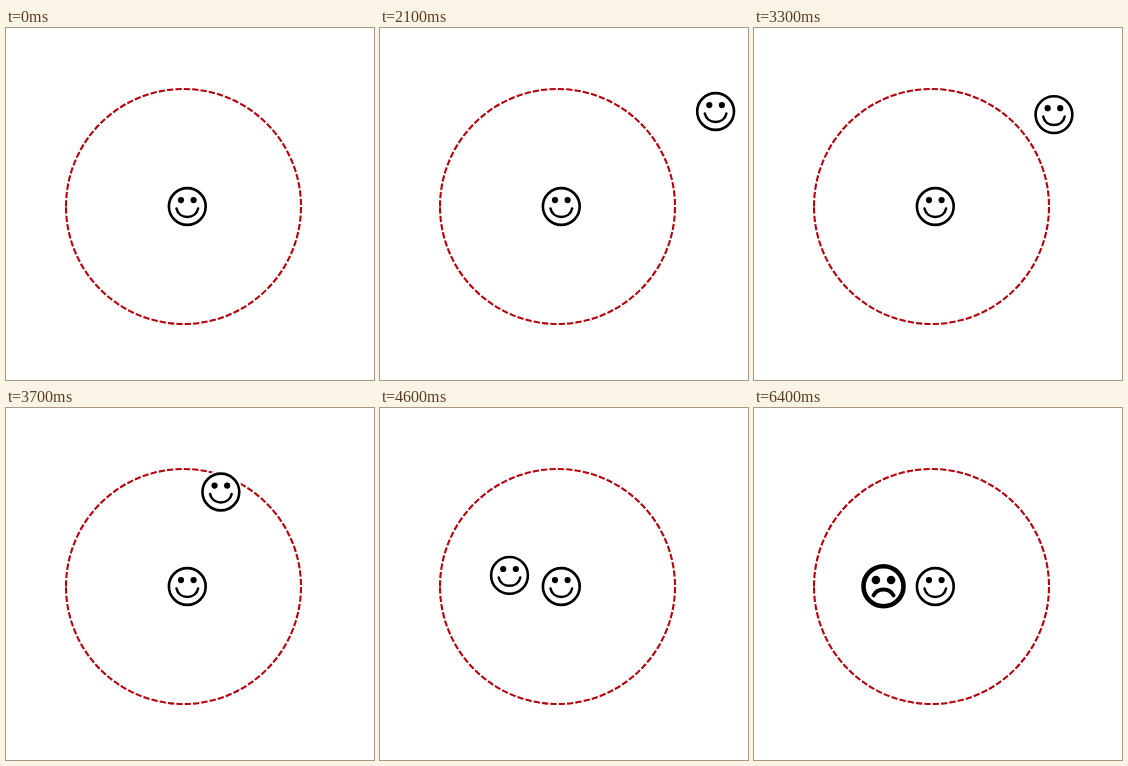
Animation, 368 px wide and 352 px high, one loop 6500 ms. Source, as an HTML page:

```html
<!DOCTYPE html>
<html lang="en">
<head>
<meta charset="utf-8">
<title>Personal space</title>
<style>
  html, body { margin: 0; width: 100%; height: 100%; overflow: hidden; background: #fff; }
  svg { display: block; width: 368px; height: 352px; }
</style>
</head>
<body>
<svg viewBox="0 0 368 352" fill="none" stroke="#000" stroke-linecap="round">
  <defs>
    <g id="happy">
      <circle r="21.5" fill="#fff" stroke="none"/>
      <circle r="18.4" stroke-width="2.6"/>
      <g fill="#000" stroke="none">
        <circle cx="-6.3" cy="-6.4" r="3.1"/>
        <circle cx="6.3" cy="-6.4" r="3.1"/>
      </g>
      <path d="M-10.8 2C-8.5 13.2 8.5 13.2 10.8 2" stroke-width="2.5"/>
    </g>
  </defs>
  <path d="M60 178.5a117.5 117.5 0 0 1 235 0a117.5 117.5 0 0 1 -235 0"
        stroke="#b4000c" stroke-width="2.1" stroke-dasharray="6.3 2.1" stroke-linecap="butt"/>
  <use href="#happy" x="181.3" y="178.5"/>
  <use href="#happy" id="visitor"/>
  <g id="sad" transform="translate(129.5 178.3)">
    <circle r="20" fill="#fff" stroke-width="4.6"/>
    <g fill="#000" stroke="none">
      <circle cx="-7.6" cy="-6.3" r="4.3"/>
      <circle cx="7.6" cy="-6.3" r="4.3"/>
    </g>
    <path d="M-10 9C-6 1.3 6 1.3 10 9" stroke-width="4"/>
  </g>
</svg>
<script>
const LOOP = 6500, STEP = 100;
const FADE_IN = 1700, MOVE = 2824, MOVE_TIME = 2000, VANISH = 5300, SAD = 6400;
const from = { x: 335.6, y: 83.5 }, to = { x: 129.5, y: 168.5 };
const visitor = document.getElementById('visitor');
const sad = document.getElementById('sad');

const clamp01 = v => Math.min(1, Math.max(0, v));
const mix = (a, b, p) => a + (b - a) * p;
const progress = (v, start, end) => clamp01((v - start) / (end - start));
const easeInOut = p => p < 0.5 ? 2 * p * p : 1 - 2 * (1 - p) ** 2;

// Goes left with a slight dip, then turns down and slows to a stop
function visitorPosition(t) {
  const p = easeInOut(progress(t, MOVE, MOVE + MOVE_TIME));
  const left = progress(p, 0, 0.655);
  const down = 1 - (1 - progress(p, 0.62, 1)) ** 1.6;
  const dip = 4 * Math.sin(Math.PI * progress(p, 0, 0.4));
  return { x: mix(from.x, to.x, left), y: mix(from.y, to.y, down) + dip };
}

function draw(now) {
  const t = Math.floor(now % LOOP / STEP) * STEP;
  const { x, y } = visitorPosition(t);
  const shown = t >= FADE_IN && t < VANISH;
  visitor.setAttribute('x', x);
  visitor.setAttribute('y', y);
  visitor.setAttribute('opacity', shown ? clamp01(0.27 + (t - FADE_IN) / 500) : 0);
  sad.setAttribute('opacity', t >= SAD ? 1 : 0);
}

const start = performance.now();
function tick() {
  draw(performance.now() - start);
  requestAnimationFrame(tick);
}
tick();
</script>
</body>
</html>
```
